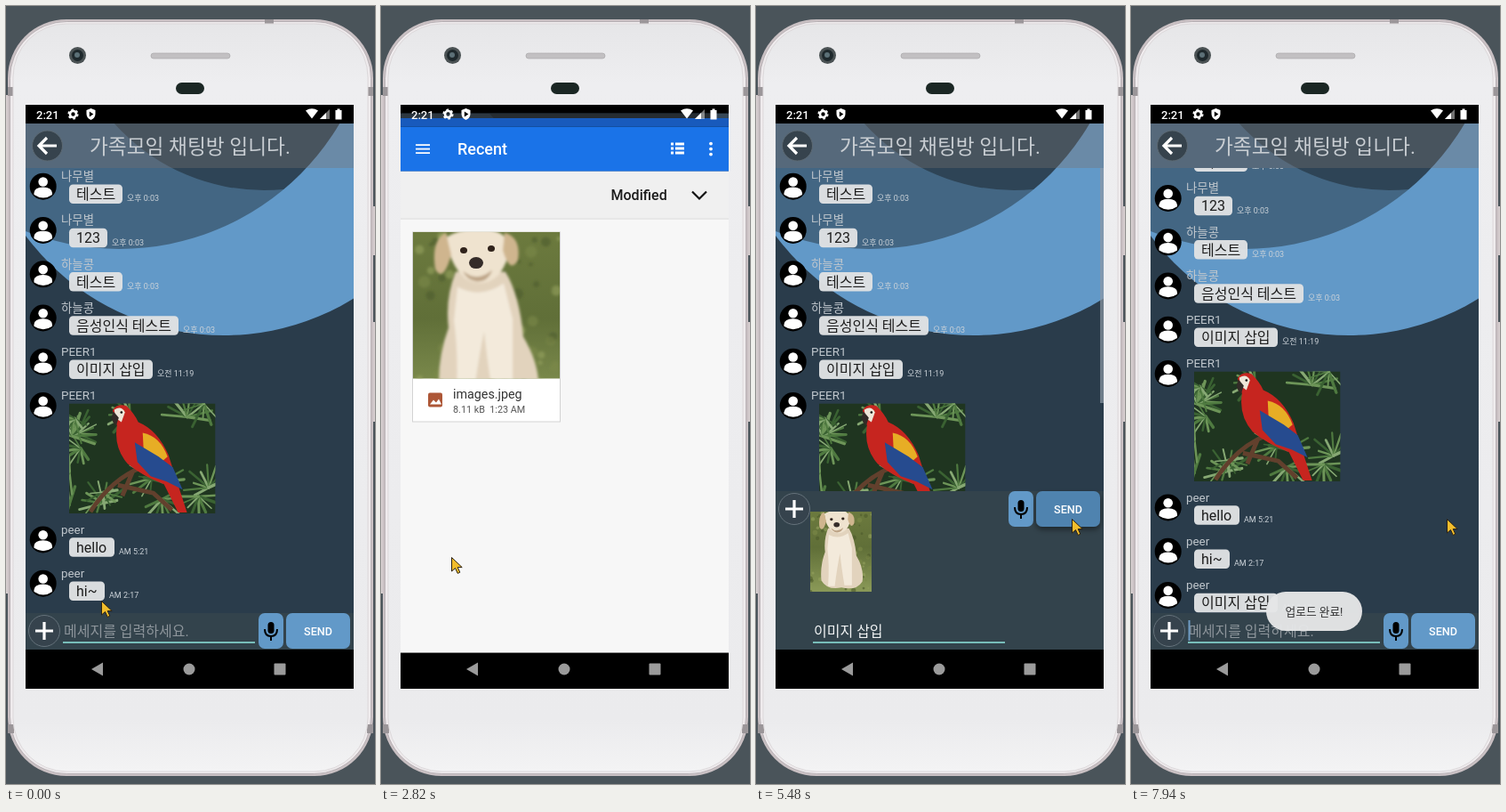
An HTML page that plays this animation: 415x874 px, repeating every 8 s.

```html
<!DOCTYPE html>
<html lang="ko">
<head>
<meta charset="utf-8">
<title>Chat image upload</title>
<style>
html, body { margin: 0; width: 100%; height: 100%; overflow: hidden; background: #4a545a; }
svg { display: block; width: 415px; height: 874px; }
svg svg { width: auto; height: auto; }
text { font-family: Roboto, "Noto Sans CJK KR", "Noto Sans CJK JP", "Noto Sans CJK", sans-serif; white-space: pre; }
.medium { font-weight: 500; }
</style>
</head>
<body>
<svg viewBox="0 0 415 874" xmlns="http://www.w3.org/2000/svg">
<defs>
  <clipPath id="screenClip"><rect x="22" y="111" width="369" height="656"/></clipPath>
  <clipPath id="wallClip"><rect x="22" y="132" width="369" height="591"/></clipPath>
  <clipPath id="ringClip"><circle cx="127.500" cy="-15" r="288"/></clipPath>
  <clipPath id="listClip"><rect id="listBox" x="22" y="182" width="369" height="500"/></clipPath>
  <clipPath id="pickerClip"><rect id="pickerBox" x="22" y="111" width="369" height="656"/></clipPath>
  <clipPath id="photoClip"><rect x="36" y="250" width="165" height="165"/></clipPath>
  <linearGradient id="body" x2="0" y2="1"><stop stop-color="#e6e6e8"/><stop offset=".08" stop-color="#eeeef0"/><stop offset=".93" stop-color="#ebebed"/><stop offset="1" stop-color="#f3f3f4"/></linearGradient>
  <linearGradient id="grass" x2="0" y2="1"><stop stop-color="#6c7a3e"/><stop offset=".45" stop-color="#606f38"/><stop offset="1" stop-color="#8b9a58"/></linearGradient>
  <filter id="shadow" x="-20%" y="-20%" width="140%" height="150%"><feDropShadow dx="0" dy="3" stdDeviation="3" flood-opacity=".45"/></filter>
  <filter id="soft"><feGaussianBlur stdDeviation="1.500"/></filter>
  <symbol id="puppy" viewBox="0 0 165 215">
    <rect width="165" height="215" fill="url(#grass)"/>
    <g id="meadow" filter="url(#soft)"/>
    <g filter="url(#soft)">
      <path d="M48 45Q36 75 40 108 26 145 30 185 46 212 84 204 124 213 140 188 146 155 124 118 120 72 104 45Z" fill="#e2d3bd"/>
      <path d="M50 62Q76 76 102 58L112 98Q112 150 112 198H92Q84 150 80 112 72 150 66 200H48Q52 140 46 100Z" fill="#f3eadb"/>
      <path d="M38 6Q54-4 74-2 98-4 106 10 111 30 96 49 80 64 59 53 40 36 38 6Z" fill="#efe3cf"/>
      <path d="M37 1Q20 10 25 42 34 58 43 26ZM103 1Q122 7 118 32 109 48 101 21Z" fill="#cfb58e"/>
      <path d="M56 44Q72 58 89 43 85 56 72 56 60 54 56 44Z" fill="#bda487"/>
    </g>
    <ellipse cx="57" cy="21" rx="4" ry="3.500" fill="#30231b"/><ellipse cx="88" cy="19" rx="4" ry="3.500" fill="#30231b"/>
    <ellipse cx="71" cy="35" rx="8" ry="6.500" fill="#352c29"/>
  </symbol>
  <symbol id="parrot" viewBox="0 0 165 124">
    <rect width="165" height="124" fill="#1f3520"/>
    <g id="leaves" fill="none" stroke-linecap="round"/>
    <path d="M24 122Q48 85 82 72M55 92 95 101 116 120M72 76 60 104" stroke="#62402d" stroke-width="5" fill="none"/>
    <path d="M49 8Q54-1 65 3 74 12 78 21 100 30 112 58L121 86 133 123H123L107 91Q83 82 66 68 50 50 54 25Z" fill="#c6251f"/>
    <path d="M83 33Q103 37 111 60L104 66 84 52Z" fill="#e7ad25"/>
    <path d="M74 44 101 60 117 72 128 97 110 88 92 82 77 66Z" fill="#264b8f"/>
    <path d="M51 7Q59 2 63 10L59 21 52 16Z" fill="#eee6d8"/><path d="M50 9Q45 19 53 25L56 16Z" fill="#332b27"/><circle cx="59" cy="10" r="1.300"/>
  </symbol>
</defs>

<rect width="415" height="874" fill="#4a545a"/>
<path d="M413 225h2v55h-2zM413 355h2v112h-2zM0 100h2v560h-2z" fill="#d4cccd"/>
<rect x="2" y="15" width="411" height="850" rx="66" fill="#c9c0c3"/>
<rect x="4.500" y="17.500" width="406" height="845" rx="64" fill="#efebed" stroke="#aaa2a6" stroke-width=".7"/>
<path d="M2 91h7v10h-7zM406 91h7v10h-7zM2 807h7v10h-7zM406 807h7v10h-7zM291 15h10v5h-10z" fill="#9b9699"/>
<rect x="8" y="20" width="399" height="840" rx="60" fill="url(#body)" stroke="#dcd8da"/>
<circle cx="80.500" cy="55.500" r="9.500" fill="#4b5254"/><circle cx="80.500" cy="55.500" r="6.500" fill="#1f292d"/><circle cx="80" cy="55" r="3" fill="#5c7077"/>
<rect x="163" y="53" width="89" height="6" rx="3" fill="#c2c0c2" stroke="#aaa8aa" stroke-width=".7"/>
<rect x="191" y="86" width="32" height="13" rx="6.500" fill="#1b2724"/>

<g clip-path="url(#screenClip)">
  <rect x="22" y="111" width="369" height="656"/>
  <g id="chat">
    <rect x="22" y="132" width="369" height="591" fill="#2a3c4b"/>
    <g clip-path="url(#wallClip)">
      <circle cx="245" cy="92" r="278" fill="#6299c8"/>
      <g clip-path="url(#ringClip)" fill="#2a3c4b">
        <rect x="22" y="132" width="369" height="150" opacity=".55"/>
        <circle cx="290" cy="-19" r="226" opacity=".8"/>
      </g>
    </g>
    <rect x="22" y="132" width="369" height="50" fill="#78706e" opacity=".36"/>
    <circle cx="46.500" cy="157" r="17" fill="#36434d" stroke="#5c6973"/>
    <path d="M57 157H37M46 148l-9 9 9 9" fill="none" stroke="#fff" stroke-width="3.200"/>
    <text x="94" y="166" font-size="22.700" fill="#c9ced3">가족모임 채팅방 입니다.</text>
    <g clip-path="url(#listClip)"><g id="list"></g></g>
    <rect id="scrollbar" x="387" width="4" fill="#8d99a5" opacity=".7"/>
    <rect id="bar" x="22" width="369" fill="#46504f" opacity=".35"/>
    <g id="buttons">
      <circle cx="43" cy="702" r="17.500" fill="#36434d" stroke="#65727b"/>
      <circle id="plusRipple" cx="43" cy="702" r="17" fill="#fff" opacity="0"/>
      <path d="M33 702h20M43 692v20" stroke="#fff" stroke-width="3.200"/>
      <rect x="284" y="682" width="28" height="40" rx="7" fill="#6299c8"/>
      <rect x="294.500" y="692" width="7" height="13" rx="3.500"/>
      <path d="M291 700q0 8 7 8t7-8M298 708v5" fill="none" stroke="#000" stroke-width="2"/>
      <rect id="send" x="315" y="682" width="72" height="40" rx="7"/>
      <text class="medium" x="351" y="706.500" font-size="12.600" fill="#fff" text-anchor="middle">SEND</text>
    </g>
    <use id="attachment" href="#puppy" x="61" y="568" width="69" height="90"/>
    <text id="field" x="65" y="707.500" font-size="16"/>
    <path d="M64 715h216" stroke="#78bdb9" stroke-width="2"/>
    <rect id="caret" x="64.500" y="690" width="2" height="23" fill="#6f9cc4"/>
    <rect x="22" y="723" width="369" height="44"/>
    <rect id="shade" x="22" y="111" width="369" height="656"/>
  </g>

  <g id="popup">
    <rect x="25.500" y="597.500" width="176" height="86" rx="2" fill="#fafafa" filter="url(#shadow)"/>
    <rect id="itemRipple" x="26" y="598" width="175" height="43" fill="#000"/>
    <g font-size="14.400" fill="#252525"><text x="40" y="624">이미지 첨부</text><text x="40" y="667">채팅 로그 저장</text></g>
  </g>

  <g id="picker"><g clip-path="url(#pickerClip)">
    <rect x="22" y="111" width="369" height="656"/>
    <rect x="22" y="111" width="369" height="21" fill="#185abc"/>
    <rect x="22" y="182" width="369" height="541" fill="#f7f7f7"/>
    <rect x="22" y="182" width="369" height="53" fill="#f0f0f0"/><path d="M22 235.500h369" stroke="#d9d9d9"/>
    <rect x="22" y="132" width="369" height="50" fill="#1a73e8"/>
    <path d="M39 152.500h16M39 157h16M39 161.500h16" stroke="#fff" stroke-width="1.800"/>
    <text class="medium" x="86" y="163.500" font-size="18" fill="#fff">Recent</text>
    <path d="M326 150h3v3h-3zM331 150h10v3h-10zM326 155h3v3h-3zM331 155h10v3h-10zM326 160h3v3h-3zM331 160h10v3h-10z" fill="#fff"/>
    <g fill="#fff"><circle cx="371" cy="151" r="1.900"/><circle cx="371" cy="157" r="1.900"/><circle cx="371" cy="163" r="1.900"/></g>
    <text class="medium" x="258.500" y="214.500" font-size="16" fill="#1c1c1c">Modified</text>
    <path d="M350 205l8 8 8-8" fill="none" stroke="#111" stroke-width="2.200"/>
    <path d="M35 250h167v214h-167z" fill="#d3d3d3"/><path d="M36 250h165v213h-165z" fill="#fff"/>
    <g clip-path="url(#photoClip)"><use href="#puppy" x="36" y="250" width="165" height="215"/></g>
    <rect x="53" y="431" width="16" height="16" rx="2" fill="#ad5636"/><path d="M55 444l4-5 3 3 3-4 3 6z" fill="#fff"/>
    <text x="81" y="437.500" font-size="14.300" fill="#333">images.jpeg</text>
    <text x="81" y="453" font-size="10.800" fill="#555">8.11 kB  1:23 AM</text>
  </g></g>

  <g fill="#fff">
    <text class="medium" x="34" y="126.500" font-size="13">2:21</text>
    <circle cx="75.500" cy="121.500" r="3.500" fill="none" stroke="#fff" stroke-width="2.600"/>
    <circle cx="75.500" cy="121.500" r="5.200" fill="none" stroke="#fff" stroke-width="1.800" stroke-dasharray="2.700 2.740"/>
    <path d="M95.500 115l5 2v4q0 5-5 7-5-2-5-7v-4z"/><path d="M93.800 118.500l4.500 3-4.500 3z" fill="#000"/>
    <path d="M337 117.500q7-4.500 14 0l-7 9z"/><path d="M353 127h11v-11z" opacity=".45"/><path d="M353 127h7v-7z"/>
    <path d="M370.500 117h2v-1.500h3v1.500h2v10.500h-7z"/>
  </g>
  <g fill="#9b9b9b"><path d="M96 745l13-7.500v15z"/><circle cx="206" cy="745" r="6.500"/><rect x="301.500" y="738.500" width="13" height="13" rx="1"/></g>

  <g id="dialog">
    <rect x="22" y="132" width="369" height="591" opacity=".56"/>
    <rect x="46" y="370" width="321" height="115.500" rx="1.500" fill="#424242" filter="url(#shadow)"/>
    <text class="medium" x="67" y="404.500" font-size="18" fill="#fff">업로드중...</text>
    <circle id="spinner" cx="88.500" cy="448" r="16.500" fill="none" stroke="#8bc5c1" stroke-width="3.500"/>
    <text id="progress" x="132" y="452.500" font-size="12.600" fill="#c3c3c3"/>
  </g>
  <g id="toast">
    <rect x="152" y="658" width="108" height="44" rx="22" fill="#e6e7e8"/>
    <text x="206" y="684.500" font-size="12.700" fill="#303030" text-anchor="middle">업로드 완료!</text>
  </g>
</g>
<path id="pointer" d="M.5.5V16L4.500 12.500 7.200 18.400 9.800 17.200 7.200 11.600H12.200Z" fill="#f2bd2c" stroke="#2a2115"/>
</svg>

<script>
const LOOP = 8000, OPEN = 2570, CLOSE = 3890, SLIDE = 425, SENT = 5650;
const el = Object.fromEntries([...document.querySelectorAll('[id]')].map(n => [n.id, n]));
const set = (node, attrs) => { for (const k in attrs) node.setAttribute(k, attrs[k]); };
const make = (parent, tag, attrs, text) => {
  const node = document.createElementNS('http://www.w3.org/2000/svg', tag);
  set(node, attrs);
  if (text) node.textContent = text;
  return parent.appendChild(node);
};
const clamp = v => Math.max(0, Math.min(1, v));
const ramp = (t, from, to) => clamp((t - from) / (to - from));
const pulse = (t, a, b, c) => ramp(t, a, b) * (1 - ramp(t, b, c));

// cubic-bezier(.4, 0, .2, 1)
function ease(x) {
  let lo = 0, hi = 1;
  for (let i = 0; i < 18; i++) {
    const s = (lo + hi) / 2;
    if (1.2 * (1 - s) ** 2 * s + .6 * (1 - s) * s * s + s ** 3 < x) lo = s; else hi = s;
  }
  return 3 * lo * lo - 2 * lo ** 3;
}

// y of the name, name, message, bubble width, time
const rows = [
  [191, '나무별', '테스트', 60, '오후 0:03'],
  [240.3, '나무별', '123', 43, '오후 0:03'],
  [289.6, '하늘콩', '테스트', 60, '오후 0:03'],
  [338.8, '하늘콩', '음성인식 테스트', 123, '오후 0:03'],
  [388, 'PEER1', '이미지 삽입', 94, '오전 11:19'],
  [437.3, 'PEER1'],
  [587.7, 'peer', 'hello', 51, 'AM 5:21'],
  [637, 'peer', 'hi~', 40, 'AM 2:17'],
  [686.3, 'peer', '이미지 삽입', 94, 'AM 2:17']
];

function addRow([y, name, message, width, time]) {
  const g = make(el.list, 'g', { transform: `translate(0 ${y})` });
  make(g, 'circle', { cx: 41.7, cy: 11.7, r: 15 });
  make(g, 'circle', { cx: 41.7, cy: 6.5, r: 5.3, fill: '#fff' });
  make(g, 'path', { d: 'M31.500 21V19Q32 12.500 41.700 12.500T52 19V21Q42 28 31.500 21Z', fill: '#fff' });
  make(g, 'text', { x: 62, y: 5, 'font-size': 13.4, fill: '#c0c7cd' }, name);
  if (!message) {
    make(g, 'use', { href: '#parrot', x: 71, y: 9.2, width: 164.5, height: 123.6 });
    return g;
  }
  make(g, 'rect', { x: 71, y: 9.5, width, height: 21.5, rx: 4.5, fill: '#dfe2e4', opacity: .97 });
  make(g, 'text', { x: 79, y: 26, 'font-size': 16, fill: '#1d1d1d' }, message);
  make(g, 'text', { x: 76 + width, y: 28.4, 'font-size': 9, fill: '#cbd2d8' }, time);
  return g;
}
const sentRow = rows.map(addRow).pop();

let seed = 7;
const random = () => (seed = seed * 16807 % 2147483647) / 2147483647;

// Palm fronds: a fan of blades around each centre
const greens = ['#4f7a40', '#6d9558', '#3a6232', '#86a873'];
for (let i = 0; i < 16; i++) {
  const x = random() * 165, y = random() * 124, turn = random() * 6.3;
  for (let k = 0; k < 9; k++) {
    const a = turn + k * .4, r = 14 + random() * 16;
    make(el.leaves, 'path', {
      d: `M${x} ${y}l${r * Math.cos(a)} ${r * Math.sin(a)}`,
      stroke: greens[(i + k) % 4], 'stroke-width': 1.5 + random() * 2
    });
  }
}
for (let i = 0; i < 90; i++) {
  make(el.meadow, 'circle', {
    cx: random() * 165, cy: random() * 215, r: 2 + random() * 5,
    fill: ['#4d5a2c', '#95a25d', '#7c8848'][i % 3], opacity: .6
  });
}

// time, x, y
const pointerPath = [
  [0, 107, 668], [220, 107, 668], [660, 55, 694], [1580, 55, 694], [1980, 79, 619],
  [2880, 79, 619], [3300, 84, 376], [3480, 82, 395], [3700, 91, 389], [4380, 91, 389],
  [4690, 230, 484], [5050, 355, 576], [LOOP, 355, 576]
];
function pointerAt(t) {
  const i = pointerPath.findIndex(p => p[0] > t);
  const [t0, x0, y0] = pointerPath[i - 1], [t1, x1, y1] = pointerPath[i];
  const u = ramp(t, t0, t1), s = u * u * (3 - 2 * u);
  return `translate(${x0 + (x1 - x0) * s} ${y0 + (y1 - y0) * s})`;
}

function caretOn(t) {
  if (t < CLOSE) return t >= 60 && (t - 60) % 1000 < 500;
  return t > SENT || (t - CLOSE) % 1000 < 500;
}

function drawChat(t, cover) {
  const attached = t >= CLOSE && t < SENT, sent = t >= SENT;
  const scroll = sent ? 36 * ease(ramp(t, SENT, SENT + 200)) : 0;
  const top = attached ? 545 : 682;
  set(el.chat, { transform: `translate(0 ${-13 * cover})` });
  set(el.shade, { opacity: .55 * cover });
  set(el.listBox, { height: top - 182 });
  set(el.list, { transform: `translate(0 ${-scroll})` });
  set(sentRow, { visibility: sent ? 'visible' : 'hidden' });
  set(el.bar, { y: top, height: 723 - top });
  set(el.buttons, { transform: `translate(0 ${top - 682})` });
  set(el.attachment, { visibility: attached ? 'visible' : 'hidden' });
  set(el.field, { fill: attached ? '#f2f4f5' : '#8d959b' });
  el.field.textContent = attached ? '이미지 삽입' : '메세지를 입력하세요.';
  set(el.caret, { opacity: +caretOn(t) });
  set(el.scrollbar, {
    y: sent ? 232 : 182, height: sent ? 450 : 264,
    opacity: attached ? .7 : sent ? .7 * (1 - ramp(t, 6250, 6550)) : 0
  });
  const pressed = t >= 5340 && t < 5750;
  set(el.send, { fill: pressed ? '#5083af' : '#6299c8', filter: pressed ? 'url(#shadow)' : 'none' });
  set(el.plusRipple, { opacity: .25 * pulse(t, 900, 1030, 1350) });
}

// Returns how far the picker has pushed the chat back
function drawPicker(t) {
  const hidden = t < CLOSE ? 1 - ease(ramp(t, OPEN, OPEN + SLIDE)) : ease(ramp(t, CLOSE, CLOSE + SLIDE));
  const clipTop = t < CLOSE ? 656 * hidden ** 2 : 0;
  set(el.picker, {
    transform: `translate(0 ${27 * hidden})`,
    opacity: 1 - ramp(t, CLOSE + 20, CLOSE + 180)
  });
  set(el.pickerBox, { y: 111 + clipTop, height: 656 - clipTop });
  return 1 - hidden;
}

function drawOverlays(t) {
  const grow = .8 + .2 * ease(ramp(t, 1120, 1340));
  set(el.popup, {
    opacity: ramp(t, 1120, 1300) * (1 - ramp(t, 2500, 2600)),
    transform: `translate(25 684) scale(${grow}) translate(-25 -684)`
  });
  set(el.itemRipple, { opacity: .1 * ramp(t, 2320, 2450) });
  set(el.dialog, { opacity: ramp(t, 5830, 6020) * (1 - ramp(t, 7020, 7220)) });
  el.progress.textContent = `Uploaded ${t < 6800 ? 0 : 100}% ...`;
  const wave = (1 - Math.cos((t - 6090) / 1333 * Math.PI * 2)) / 2;
  set(el.spinner, {
    'stroke-dasharray': `${76 - 50 * wave} 104`,
    transform: `rotate(${(t - 6090) * .36 + 15} 88.5 448)`
  });
  set(el.toast, { opacity: .96 * ramp(t, 7660, 7920) });
  set(el.pointer, { transform: pointerAt(t) });
}

function render(t) {
  drawChat(t, drawPicker(t));
  drawOverlays(t);
}
const start = performance.now();
function tick() {
  render((performance.now() - start) % LOOP);
  requestAnimationFrame(tick);
}
tick();
</script>
</body>
</html>
```
